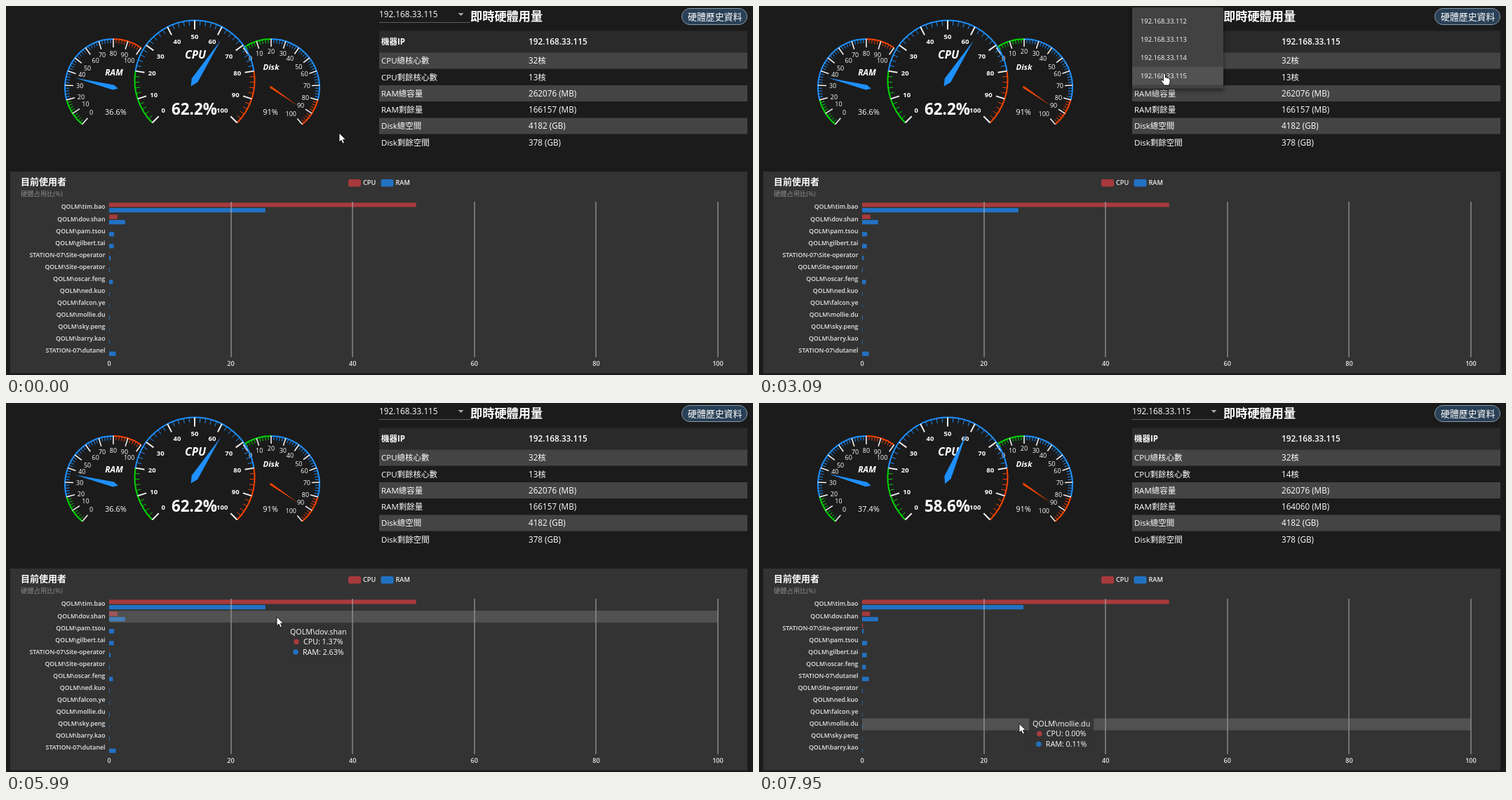
Write an HTML page that moves like this. It is 1065x526 px and loops after 8000 ms.

```html
<!DOCTYPE html>
<html lang="zh-Hant">
<head>
<meta charset="utf-8">
<title>Hardware dashboard</title>
<style>
html, body { margin: 0; width: 100%; height: 100%; overflow: hidden; background: #1b1b1b; }
svg { display: block; width: 1065px; height: 526px; }
text { font-family: "Open Sans", "Noto Sans CJK TC", "Noto Sans CJK", sans-serif; white-space: pre; }
</style>
</head>
<body>
<svg id="stage" viewBox="0 0 1065 526"></svg>
<script>
const LOOP = 8000, STEP = 78.2, PHASE = 2310;
const RED = '#a83a3c', BLUE = '#2272c3';
const stage = document.getElementById('stage');

function el(tag, attrs, parent = stage) {
  const node = document.createElementNS('http://www.w3.org/2000/svg', tag);
  for (const k in attrs) node.setAttribute(k, attrs[k]);
  parent.appendChild(node);
  return node;
}
const group = (parent = stage) => el('g', {}, parent);
const rect = (x, y, width, height, fill, parent, more) =>
  el('rect', { x, y, width, height, fill, ...more }, parent);

// y is the optical middle of the line
function text(str, x, y, size, opts = {}, parent) {
  const node = el('text', {
    x, y: y + size * 0.36, 'font-size': size, fill: '#fff', ...opts
  }, parent);
  node.textContent = str;
  return node;
}
const place = (node, x, y) => node.setAttribute('transform', `translate(${x} ${y})`);
const show = (node, on) => node.setAttribute('visibility', on ? 'visible' : 'hidden');
const clamp = v => Math.max(0, Math.min(1, v));
const mix = (a, b, k) => a + (b - a) * k;

function track(keys, t) {
  let i = 0;
  while (i < keys.length - 2 && t > keys[i + 1][0]) i++;
  const a = keys[i], b = keys[i + 1];
  const k = clamp((t - a[0]) / (b[0] - a[0]));
  return a.slice(1).map((v, j) => mix(v, b[j + 1], k));
}

// ---- data ----
const users = [
  ['QOLM\\tim.bao', 50.42, 25.66], ['QOLM\\dov.shan', 1.37, 2.63],
  ['QOLM\\pam.tsou', 0, 0.83], ['QOLM\\gilbert.tai', 0, 0.76],
  ['STATION-07\\Site-operator', 0.05, 0.25], ['QOLM\\Site-operator', 0.01, 0.11],
  ['QOLM\\oscar.feng', 0, 0.62], ['QOLM\\ned.kuo', 0, 0.08],
  ['QOLM\\falcon.ye', 0, 0.07], ['QOLM\\mollie.du', 0, 0.11],
  ['QOLM\\sky.peng', 0, 0.05], ['QOLM\\barry.kao', 0, 0.09],
  ['STATION-07\\dutanel', 0, 1.1]
];
const later = users.map(u => [...u]);
later[0][2] = 26.5;
later[1][1] = 1.28;
later[4][1] = 0.15;
const before = { cpu: 62.2, ram: 36.6, cores: '13核', free: '166157 (MB)', rows: users };
const after = {
  cpu: 58.6, ram: 37.4, cores: '14核', free: '164060 (MB)',
  rows: [0, 1, 4, 2, 3, 6, 12, 5, 7, 8, 9, 10, 11].map(i => later[i])
};
const REFRESH = 7560, EASE = 340;

// ---- gauges ----
function gauge(g) {
  const rad = v => (g.start - (g.start - g.end) * v / 100) * Math.PI / 180;
  const at = (v, r) => [g.x + r * Math.cos(rad(v)), g.y - r * Math.sin(rad(v))];
  const zones = [[0, 20, '#05d305'], [20, 80, '#1e90ff'], [80, 100, '#f54300']];
  const line = (v, r0, r1, stroke, width) => {
    const [x1, y1] = at(v, r0), [x2, y2] = at(v, r1);
    el('line', { x1, y1, x2, y2, stroke, 'stroke-width': width });
  };
  for (const [a, b, stroke] of zones)
    el('path', {
      d: `M${at(a, g.r - 1)} A${g.r - 1} ${g.r - 1} 0 0 1 ${at(b, g.r - 1)}`,
      fill: 'none', stroke, 'stroke-width': 2
    });
  for (let v = 0; v <= 100; v += 2) {
    const zone = zones.find(z => v <= z[1]);
    if (v % 10) line(v, g.r - 1, g.r - g.minor, zone[2], 1);
    else line(v, g.r - 1, g.r - g.major, '#f0f0f0', g.bold ? 2 : 1.6);
  }
  for (let v = 0; v <= 100; v += 10) {
    const [x, y] = at(v, g.labelR), c = Math.cos(rad(v)), s = Math.sin(rad(v));
    const dy = s > 0.4 ? 4.7 : s < -0.4 ? -4.7 : 0;
    text(v, x, y + dy, g.bold ? 9.5 : 9, {
      'font-weight': g.bold ? 700 : 400,
      'text-anchor': c < -0.4 ? 'start' : c > 0.4 ? 'end' : 'middle'
    });
  }
  text(g.name, ...g.title, { 'font-weight': 700, 'font-style': 'italic', 'text-anchor': 'middle' });
  const needle = el('path', { fill: g.fill });
  const value = text('', ...g.value, { 'font-weight': g.bold ? 700 : 400, 'text-anchor': 'middle' });
  return (v, label) => {
    const c = Math.cos(rad(v)), s = Math.sin(rad(v)), w = g.width;
    const p = (along, side) => [g.x + along * c + side * s, g.y - along * s + side * c];
    needle.setAttribute('d', `M${p(-2 * w, 0)}L${p(0, w)}L${p(g.len, 0)}L${p(0, -w)}Z`);
    value.textContent = label + '%';
  };
}
const setRam = gauge({
  name: 'RAM', x: 153, y: 116, r: 70, start: 230, end: 55, minor: 7, major: 13, labelR: 53,
  title: [154, 95, 12], value: [156.5, 151, 11], fill: '#1e90ff', len: 56, width: 3.5
});
const setDisk = gauge({
  name: 'Disk', x: 378, y: 116, r: 70, start: 125, end: -50, minor: 7, major: 12, labelR: 56,
  title: [378, 87, 11.3], value: [377, 151, 11], fill: '#f04400', len: 46, width: 1.6
});
const setCpu = gauge({
  name: 'CPU', x: 269, y: 106, r: 86.5, start: 225, end: -45, minor: 8, major: 14, labelR: 67,
  title: [270, 69, 16], value: [268.5, 146.5, 22.4], fill: '#1e90ff', len: 68, width: 5, bold: true
});
setDisk(91, 91);

// ---- header and table ----
const ROW_TOP = 66.5, ROW_H = 23.25;
text('192.168.33.115', 532, 12, 11.8);
rect(532, 23, 130, 1, '#5c5c5c');
el('path', { d: 'M644.5 10h8l-4 4z', fill: '#a8a8a8' });
text('即時硬體用量', 662, 15, 17.2, { 'font-weight': 700 });
rect(963.5, 3.5, 93, 23, '#294056', stage, { rx: 11.5, stroke: '#8b99a6' });
text('硬體歷史資料', 972, 15, 12.9);
rect(532, 35.5, 525, 31, '#2a2a2a');
text('機器IP', 535, 51, 11.5, { 'font-weight': 700 });
text('192.168.33.115', 745, 51, 11.8, { 'font-weight': 600 });
const cells = [
  ['CPU總核心數', '32核'], ['CPU剩餘核心數', ''], ['RAM總容量', '262076 (MB)'],
  ['RAM剩餘量', ''], ['Disk總空間', '4182 (GB)'], ['Disk剩餘空間', '378 (GB)']
].map(([name, val], i) => {
  const y = ROW_TOP + i * ROW_H, base = i % 2 ? '#1b1b1b' : '#444';
  const bg = rect(532, y, 525, ROW_H, base);
  text(name, 535, y + 11.7, 11.5);
  return { bg, base, val: text(val, 745, y + 11.7, 11.7) };
});

// ---- chart ----
const X0 = 147, UNIT = 8.68, TOP = 279, BAND = 17.05;
rect(6, 236, 1051, 287.5, '#333');
text('目前使用者', 21, 250.5, 13, { 'font-weight': 700 });
text('硬體占用比(%)', 21, 268, 9.3, { fill: '#8c8c8c' });
[['CPU', 488, RED], ['RAM', 534.5, BLUE]].forEach(([name, x, fill]) => {
  rect(x, 247, 18, 10.5, fill, stage, { rx: 2.5 });
  text(name, x + 21, 252, 9.2, { fill: '#eee', 'font-weight': 600 });
});
const bars = users.map((_, i) => {
  const y = TOP + i * BAND;
  return {
    label: text('', 141.5, y + 7.3, 8.8, { fill: '#e6e6e6', 'font-weight': 600, 'text-anchor': 'end' }),
    cpu: rect(X0, y + 1.4, 0, 6.2, RED),
    ram: rect(X0, y + 9, 0, 6.2, BLUE)
  };
});
for (let v = 0; v <= 100; v += 20) {
  const x = X0 + v * UNIT;
  if (v) rect(Math.round(x) - 0.5, TOP, 1, 221.5, '#b4b4b4');
  text(v, x, 509.5, 9.2, { fill: '#e6e6e6', 'font-weight': 600, 'text-anchor': 'middle' });
}
const band = rect(X0, TOP, 868, BAND, '#969696', stage, { opacity: 0.3 });

// ---- tooltip ----
const tip = group();
const tipBox = rect(0, -9, 0, 50, '#323232', tip, { rx: 3, opacity: 0.85 });
const tipName = text('', 0, 0, 10.7, { 'text-anchor': 'middle' }, tip);
const tipRows = [RED, BLUE].map((fill, i) => ({
  dot: el('circle', { cy: 14.6 * (i + 1), r: 3.8, fill }, tip),
  line: text('', 0, 14.6 * (i + 1), 10.7, {}, tip)
}));
function fillTip(row) {
  tipName.textContent = row[0];
  const lines = [`CPU: ${row[1].toFixed(2)}%`, `RAM: ${row[2].toFixed(2)}%`];
  tipRows.forEach((r, i) => { r.line.textContent = lines[i]; });
  const widths = tipRows.map(r => r.line.getComputedTextLength() + 14);
  const width = Math.max(tipName.getComputedTextLength(), ...widths) + 10;
  tipBox.setAttribute('width', width);
  tipName.setAttribute('x', width / 2);
  tipRows.forEach((r, i) => {
    const left = (width - widths[i]) / 2;
    r.dot.setAttribute('cx', left + 4);
    r.line.setAttribute('x', left + 14);
  });
}

// ---- dropdown ----
const menu = group();
menu.style.transformOrigin = '532px 2px';
menu.style.filter = 'drop-shadow(0 3px 3px rgba(0,0,0,.5))';
rect(532, 2, 130, 115.5, '#424242', menu, { rx: 2 });
const items = [112, 113, 114, 115].map((n, i) => {
  const bg = rect(532, 8.5 + 26 * i, 130, 26, '#424242', menu);
  text('192.168.33.' + n, 544, 21.5 + 26 * i, 9.3, {}, menu);
  return bg;
});

// ---- pointer ----
const arrow = el('path', {
  d: 'M0 0V13L3 10.3L5 15L7.4 14L5.4 9.4H9.4Z',
  fill: '#fff', stroke: '#000', 'stroke-width': 0.8
});
const hand = el('path', {
  d: 'M-1.5 1.2Q0 -1 1.5 1.2V6Q3 5 4 6.6Q5.6 5.8 6.4 7.4Q8 7 8.2 9V12Q8 14 6.6 17H-.6Q-1.6 14 -4.6 10.6Q-4.8 8.6 -2.8 9.2L-1.5 10.6Z',
  fill: '#fff', stroke: '#000', 'stroke-width': 0.9
});
const path = [
  [0, 475, 181], [511, 475, 181], [850, 531, 104], [1200, 586, 20], [1370, 586, 20],
  [1450, 590, 17], [2230, 590, 17], [2310, 592, 20], [2700, 588, 58], [3090, 578, 96],
  [3180, 573, 100], [3450, 536, 152], [3716, 507, 188], [3960, 496, 187], [4030, 493, 189],
  [4480, 455, 222], [4810, 418, 254], [4890, 408, 266], [5680, 389, 288], [5990, 386, 305],
  [6530, 383, 336], [6840, 381, 368], [7400, 376, 402], [7940, 371, 457]
];
const tipLag = [[0, 21], [5990, 21], [6840, 19], [7400, 19], [7940, 0]];

function render(time) {
  const t = PHASE + Math.floor((time + 8 - PHASE) / STEP) * STEP;
  const [x, y] = track(path, t);
  const open = clamp((t - 1580) / 300) * clamp((4330 - t) / 240);
  const inMenu = open > 0 && x >= 532 && x < 662 && y < 117;

  menu.style.opacity = open;
  menu.style.transform = t < 2000 ? `scale(${mix(0.75, 1, open)})` : 'none';
  show(menu, open > 0);
  const item = inMenu ? Math.floor((y - 8.5) / 26) : -1;
  items.forEach((bg, i) => bg.setAttribute('fill', i === item || i === 3 ? '#525252' : '#424242'));

  const hover = x >= 532 && !inMenu ? Math.floor((y - ROW_TOP) / ROW_H) : -1;
  cells.forEach((c, i) => c.bg.setAttribute('fill', i === hover ? '#616161' : c.base));

  const now = t >= REFRESH ? after : before;
  const k = 1 - (1 - clamp((t - REFRESH) / EASE)) ** 3;
  setCpu(mix(before.cpu, after.cpu, k), now.cpu);
  setRam(mix(before.ram, after.ram, k), now.ram);
  cells[1].val.textContent = now.cores;
  cells[3].val.textContent = now.free;
  bars.forEach((b, i) => {
    const a = before.rows[i], z = after.rows[i];
    b.label.textContent = now.rows[i][0];
    b.cpu.setAttribute('width', mix(a[1], z[1], k) * UNIT);
    b.ram.setAttribute('width', mix(a[2], z[2], k) * UNIT);
  });

  const inGrid = t > 4800 && y >= TOP;
  show(band, inGrid);
  show(tip, inGrid);
  if (inGrid) {
    const row = Math.min(12, Math.floor((y - TOP) / BAND));
    band.setAttribute('y', TOP + row * BAND);
    fillTip(now.rows[row]);
    place(tip, x + 14, y + track(tipLag, t)[0]);
  }

  const onLink = inMenu || (x >= 532 && x < 662 && y < 20);
  show(hand, onLink);
  show(arrow, !onLink);
  place(onLink ? hand : arrow, x, y);
}

const startTime = performance.now();
function frame() {
  render((performance.now() - startTime) % LOOP);
  requestAnimationFrame(frame);
}
frame();
</script>
</body>
</html>
```
